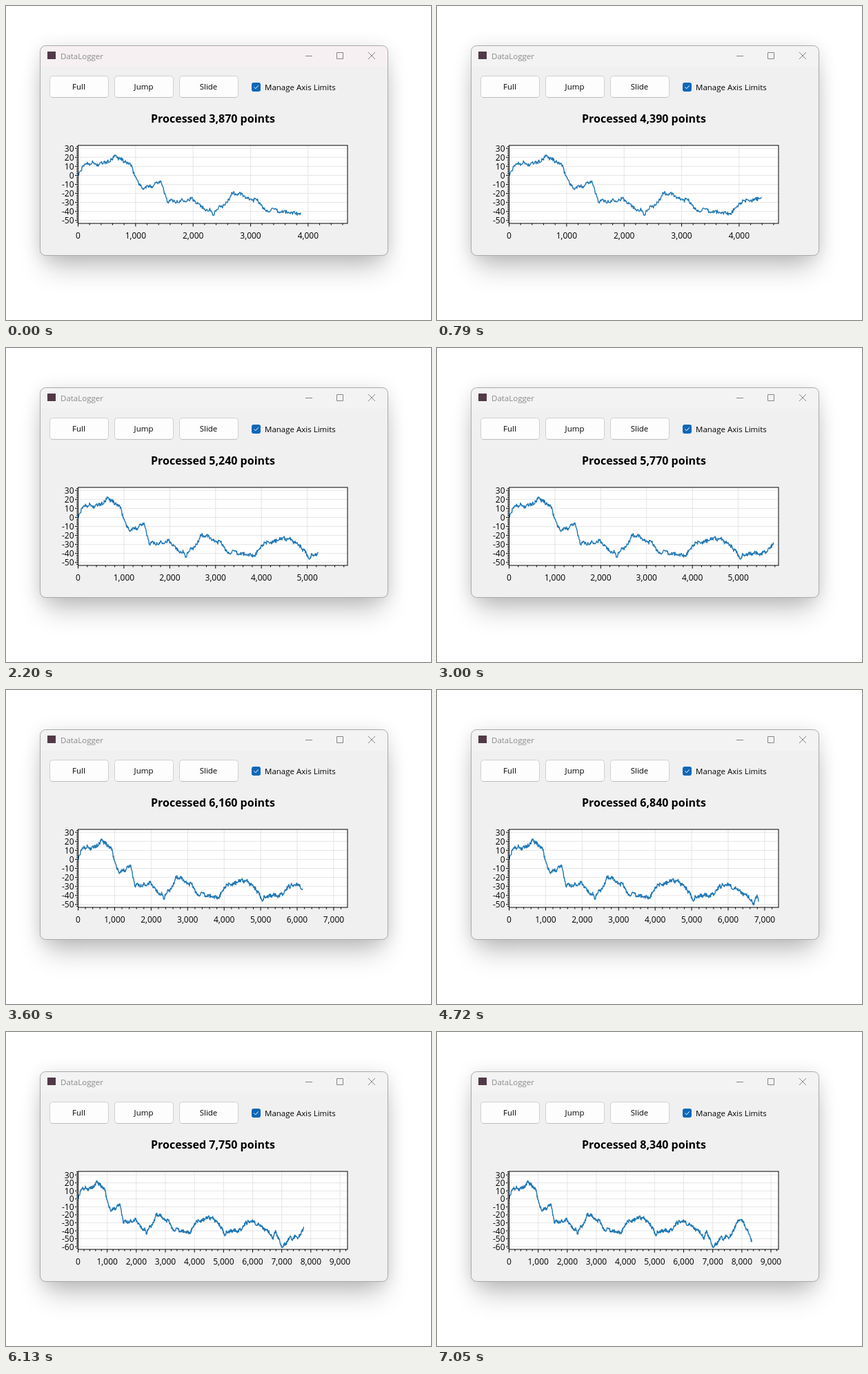
Write an HTML page that moves like this. It is 616 px wide and 455 px high and loops after 7150 ms.

```html
<!DOCTYPE html>
<html lang="en">
<head>
<meta charset="utf-8">
<title>DataLogger</title>
<style>
  html, body { margin: 0; width: 100%; height: 100%; overflow: hidden; background: #fff; }
  .shadow {
    position: absolute; left: 50px; top: 58px; width: 503px; height: 303px; border-radius: 8px;
    box-shadow: 0 26px 36px -8px rgba(0, 0, 0, .22), 0 2px 26px rgba(0, 0, 0, .13);
  }
  svg { position: absolute; left: 0; top: 0; display: block; }
  text { font: 11.5px "Open Sans", "Noto Sans", sans-serif; fill: #000; }
  .tick { font-size: 12px; }
  .mid { text-anchor: middle; }
  .end { text-anchor: end; }
  #status { font-size: 16px; font-weight: 700; }
</style>
</head>
<body>
<div class="shadow"></div>
<svg width="616" height="455" viewBox="0 0 616 455">
  <defs><clipPath id="area"><rect x="104" y="202" width="391" height="113"/></clipPath></defs>
  <rect x="50" y="58" width="503" height="303" rx="8" fill="#f0f0f0"/>
  <path id="titleBar" d="M50 88V66a8 8 0 0 1 8-8H545a8 8 0 0 1 8 8V88Z"/>
  <rect x="49.5" y="57.5" width="504" height="304" rx="8" fill="none" stroke="#a9a9a9"/>
  <rect x="60" y="66" width="12" height="11" fill="#513947"/>
  <text x="79" y="77" style="fill:#8a8a8a">DataLogger</text>
  <path d="M434 72.5H444M479.5 67.5H488.5V76.5H479.5ZM525 67L535 77M535 67L525 77" fill="none" stroke="#858585"/>
  <g id="buttons"></g>
  <rect x="356" y="111" width="13" height="13" rx="3" fill="#0f67b8"/>
  <path d="M359.5 117.5L361.7 119.8L365.7 115.3" fill="none" stroke="#fff"/>
  <text x="375" y="122">Manage Axis Limits</text>
  <text id="status" class="mid" x="300" y="168.5"></text>
  <rect x="104.5" y="202" width="390.5" height="113" fill="#fff"/>
  <path id="grid" stroke="#e5e5e5"/>
  <path id="trace" fill="none" stroke="#1f77b4" stroke-width="1.4" stroke-linejoin="round" clip-path="url(#area)"/>
  <rect x="104.5" y="202" width="390.5" height="113" fill="none" stroke="#000"/>
  <path id="ticks" stroke="#000"/>
  <g id="labels"></g>
</svg>
<script>
const LOOP = 7150, INTERVAL = 100.7, LEAD = 27, LAST_UPDATE = 70;
const LEFT = 104.5, RIGHT = 495, TOP = 202, BOTTOM = 315;
const $ = id => document.getElementById(id);

// Update index and number of points processed by then.
const progress = [[0, 3870], [8, 4390], [22, 5240], [36, 6160], [47, 6840], [55, 7360], [70, 8340]];

// Main turning points of the signal: point number, level.
const turns = [
  [0, 0], [110, 12], [480, 14], [640, 22], [930, 10], [1100, -15], [1430, -7], [1570, -30],
  [1980, -26], [2350, -42], [2580, -31], [2680, -19], [3130, -28], [3230, -39], [3850, -42],
  [4060, -28], [4560, -23], [4780, -28], [5030, -43], [5350, -41], [5620, -39], [5770, -30],
  [5980, -27], [6560, -42], [6700, -49], [6790, -42], [7010, -60], [7300, -49], [7600, -46],
  [7900, -27], [8060, -29], [8340, -53]
];

function interpolate(points, x) {
  const k = Math.max(1, points.findIndex(p => p[0] >= x));
  const [x0, y0] = points[k - 1], [x1, y1] = points[k];
  return y0 + (y1 - y0) * (x - x0) / (x1 - x0);
}

// Seeded noise in -1..1, linear between whole numbers.
function noise(x) {
  const at = i => {
    const s = Math.sin(i * 12.9898 + 4.1) * 43758.5453;
    return (s - Math.floor(s)) * 2 - 1;
  };
  const i = Math.floor(x);
  return at(i) + (at(i + 1) - at(i)) * (x - i);
}

const signal = n => interpolate(turns, n) + (n ? 2 * noise(n / 10) + 2 * noise(n / 50 + 2000) : 0);

const pointCount = index => Math.round(interpolate(progress, index) / 10) * 10;

const label = (value, x, y, align) =>
  `<text class="tick ${align}" x="${x}" y="${y}">${value.toLocaleString("en-US")}</text>`;

function draw(index) {
  const count = pointCount(index);
  // The axes grow in jumps once the data leaves them.
  let xMax = 4685;
  while (count > xMax) xMax *= 1.255;
  const [yMin, yMax] = count > 6860 ? [-63.3, 34.4] : [-53.2, 33.2];
  const px = x => LEFT + x / xMax * (RIGHT - LEFT);
  const py = y => BOTTOM - (y - yMin) / (yMax - yMin) * (BOTTOM - TOP);

  let grid = "", ticks = "", labels = "", trace = "";
  for (let x = 0; x <= xMax; x += 200) {
    const major = x % 1000 === 0;
    ticks += `M${px(x)} ${BOTTOM}v${major ? 4.5 : 2.5}`;
    if (!major) continue;
    grid += `M${px(x)} ${TOP}V${BOTTOM}`;
    labels += label(x, px(x), 336.5, "mid");
  }
  for (let y = Math.ceil(yMin / 2) * 2; y <= yMax; y += 2) {
    const major = y % 10 === 0;
    ticks += `M${LEFT} ${py(y)}h${major ? -4.5 : -2.5}`;
    if (!major) continue;
    grid += `M${LEFT} ${py(y)}H${RIGHT}`;
    labels += label(y, 98.5, py(y) + 4.5, "end");
  }
  for (let n = 0; n <= count; n += 10)
    trace += `${n ? "L" : "M"}${px(n).toFixed(2)} ${py(signal(n)).toFixed(2)}`;

  $("grid").setAttribute("d", grid);
  $("ticks").setAttribute("d", ticks);
  $("trace").setAttribute("d", trace);
  $("labels").innerHTML = labels;
  $("status").textContent = `Processed ${count.toLocaleString("en-US")} points`;
  $("titleBar").setAttribute("fill", index ? "#f3f3f3" : "#f6f0f3");
}

$("buttons").innerHTML = ["Full", "Jump", "Slide"].map((name, i) => {
  const x = 63.5 + i * 94;
  return `<rect x="${x}" y="101.5" width="85" height="31" rx="4" fill="#fdfdfd" stroke="#d0d0d0"/>
    <path d="M${x + 3} 132.5h79" stroke="#bcbcbc"/>
    <text class="mid" x="${x + 42}" y="121">${name}</text>`;
}).join("");

let shown = -1;
const start = performance.now();
function tick() {
  const time = (performance.now() - start) % LOOP;
  const index = Math.min(LAST_UPDATE, Math.floor((time + LEAD) / INTERVAL));
  if (index !== shown) draw(shown = index);
  requestAnimationFrame(tick);
}
tick();
</script>
</body>
</html>
```
